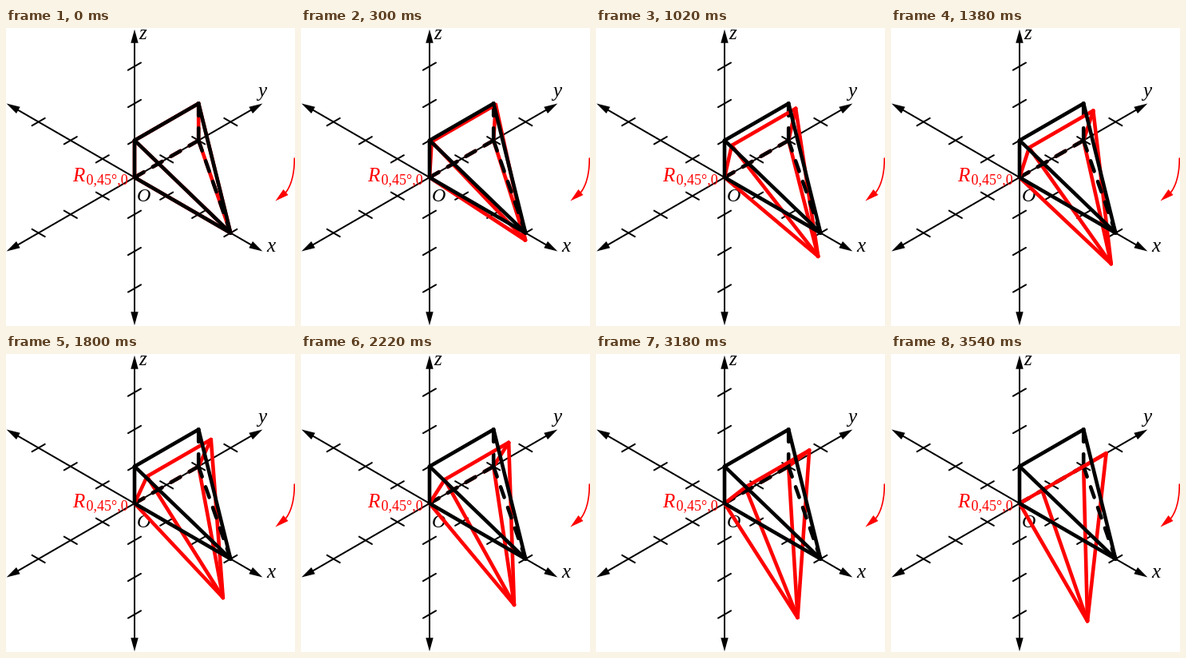
These frames come from a looping animation (362x373 px, 7200 ms). An HTML page with a canvas:

```html
<!DOCTYPE html>
<html lang="en">
<head>
<meta charset="utf-8">
<title>Rotating a solid about the y axis</title>
<style>
html, body { margin: 0; width: 100%; height: 100%; overflow: hidden; background: #fff; }
canvas { display: block; }
</style>
</head>
<body>
<canvas id="stage" width="362" height="373"></canvas>
<script>
const ctx = document.getElementById('stage').getContext('2d');
const LOOP = 7200, STEP = 60, LAST = 59;
const UNIT = 46.3, UX = UNIT * Math.sqrt(3) / 2, UY = UNIT / 2;
const RED = '#f00', BLACK = '#000';
const SERIF = '"Liberation Serif", serif';

// isometric projection
const project = ([x, y, z]) => [161 + (x + y) * UX, 187 + (x - y) * UY - z * UNIT];

const rotateY = ([x, y, z], a) => [
  x * Math.cos(a) + z * Math.sin(a), y, z * Math.cos(a) - x * Math.sin(a)
];

const solid = { O: [0, 0, 0], A: [0, 0, 1], B: [0, 2, 1], C: [0, 2, 0], D: [3, 0, 0] };

function line(p, q, color, width, dashed) {
  ctx.strokeStyle = color;
  ctx.lineWidth = width;
  if (dashed) {
    // odd number of equal parts, so that both ends are inked
    const len = Math.hypot(q[0] - p[0], q[1] - p[1]);
    const parts = 2 * Math.round((len / 13.3 - 1) / 2) + 1;
    ctx.setLineDash([len / parts, len / parts]);
  }
  ctx.beginPath();
  ctx.moveTo(...p);
  ctx.lineTo(...q);
  ctx.stroke();
  ctx.setLineDash([]);
}

function arrowHead([x, y], angle, color) {
  ctx.save();
  ctx.translate(x, y);
  ctx.rotate(angle);
  ctx.fillStyle = color;
  ctx.beginPath();
  ctx.moveTo(0, 0);
  ctx.lineTo(-17, -4.7);
  ctx.lineTo(-17, 4.7);
  ctx.fill();
  ctx.restore();
}

function axis(dir, tickDir) {
  const at = k => dir.map(v => v * k);
  const p = project(at(-4)), q = project(at(4));
  const angle = Math.atan2(q[1] - p[1], q[0] - p[0]);
  line(project(at(-3.75)), project(at(3.75)), BLACK, 2);
  arrowHead(q, angle, BLACK);
  arrowHead(p, angle + Math.PI, BLACK);
  for (let k = -3; k <= 3; k++) {
    if (!k) continue;
    const end = s => project(at(k).map((v, i) => v + s * tickDir[i]));
    line(end(-0.2), end(0.2), BLACK, 2);
  }
}

function text(str, x, y, size, color, style = 'italic') {
  ctx.font = `${style} ${size}px ${SERIF}`;
  ctx.fillStyle = color;
  ctx.fillText(str, x, y);
}

function turnArrow() {
  ctx.strokeStyle = RED;
  ctx.lineWidth = 1.7;
  ctx.beginPath();
  ctx.moveTo(361.3, 163);
  ctx.bezierCurveTo(361.3, 184, 357, 200, 347, 210);
  ctx.stroke();
  arrowHead([337.5, 216.5], Math.atan2(11, -13), RED);
}

function edges(points, list, color, dashed) {
  for (const [a, b] of list.split(' ')) line(points[a], points[b], color, 4.6, dashed);
}

function place(angle) {
  const points = {};
  for (const k in solid) points[k] = project(rotateY(solid[k], angle));
  return points;
}

function draw(angle) {
  ctx.fillStyle = '#fff';
  ctx.fillRect(0, 0, 362, 373);
  ctx.lineCap = 'round';

  axis([1, 0, 0], [0, 1, 0]);
  axis([0, 1, 0], [1, 0, 0]);
  axis([0, 0, 1], [0, 1, 0]);
  text('x', 327, 280, 25, BLACK);
  text('y', 316, 86, 25, BLACK);
  text('z', 167, 14, 25, BLACK);
  text('O', 164, 217, 24, BLACK);

  const fixed = place(0), turned = place(angle);
  edges(turned, 'OC', RED, true);
  edges(turned, 'BC CD OD AD BD', RED);
  edges(fixed, 'OC BC CD', BLACK, true);
  edges(turned, 'OA AB', RED);
  edges(fixed, 'OA AB OD AD BD', BLACK);

  turnArrow();
  text('R', 84, 192, 25, RED);
  text('0,45°,0', 100.5, 196, 18, RED, 'normal');
}

function frame(now) {
  const step = Math.min(LAST, Math.floor((now % LOOP) / STEP));
  draw(Math.PI / 4 * step / LAST);
  requestAnimationFrame(frame);
}

draw(0);
requestAnimationFrame(frame);
</script>
</body>
</html>
```
